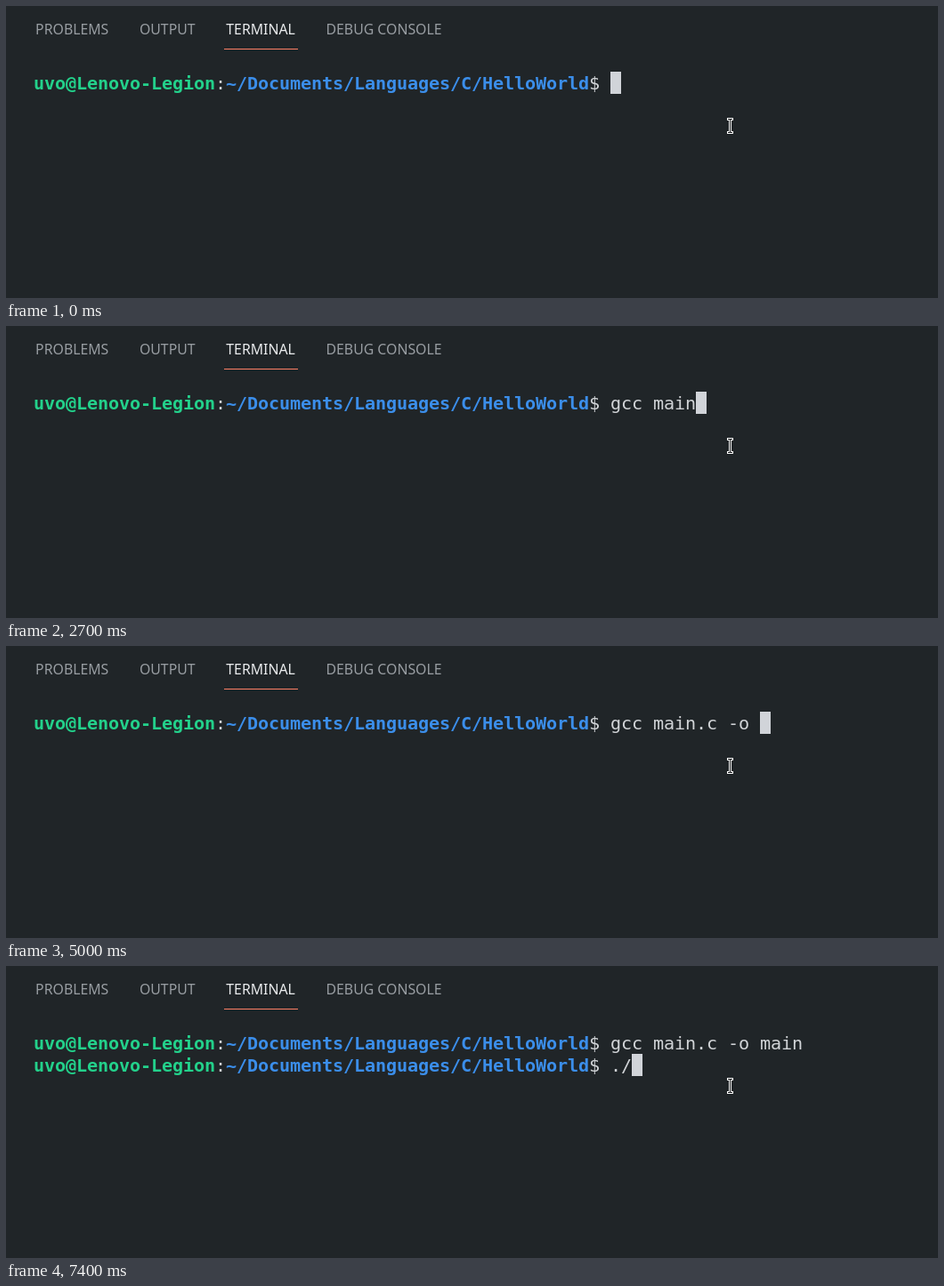
These frames come from a looping animation (1047 px wide and 329 px high, 8000 ms). An HTML page with a canvas:

```html
<!DOCTYPE html>
<html lang="en">
<head>
<meta charset="utf-8">
<title>Terminal</title>
<style>
  html, body { margin: 0; width: 100%; height: 100%; overflow: hidden; background: #202528; }
  canvas { display: block; }
</style>
</head>
<body>
<canvas id="stage" width="1047" height="329"></canvas>
<script>
const ctx = document.getElementById('stage').getContext('2d');

const LOOP = 8000;
const LEFT = 31, TOP = 74, CELL_W = 12, CELL_H = 25, BASELINE = 20;
const MONO = '20.16px "DejaVu Sans Mono", monospace';
const COLORS = {
  back: '#202528', text: '#d1d4d7', cursor: '#d1d4d9',
  green: '#23d18b', blue: '#3b8eea',
  tab: '#989da2', activeTab: '#e9ebed', underline: '#ff8066'
};

const TABS = [['PROBLEMS', 33.1], ['OUTPUT', 149.9], ['TERMINAL', 247.3], ['DEBUG CONSOLE', 359.5]];
const PROMPT = [
  ['uvo@Lenovo-Legion', COLORS.green, true],
  [':', COLORS.text, false],
  ['~/Documents/Languages/C/HelloWorld', COLORS.blue, true],
  ['$ ', COLORS.text, false]
];

// Each command holds its characters' key press times.
const ENTER = 6400;
const COMMANDS = [
  { start: 0, text: 'gcc main.c -o main',
    keys: [350, 800, 1000, 1500, 1850, 2100, 2450, 2700, 3250,
           3500, 4100, 4500, 4750, 5000, 5200, 5350, 5500, 5550] },
  { start: ENTER, text: './', keys: [7350, 7400] }
];

function rect(color, x, y, w, h) {
  ctx.fillStyle = color;
  ctx.fillRect(x, y, w, h);
}

// Writes on the character grid and returns the next free column.
function write(text, col, row, color, bold) {
  ctx.font = (bold ? 'bold ' : '') + MONO;
  ctx.fillStyle = color;
  for (const char of text) {
    ctx.fillText(char, LEFT + col * CELL_W, TOP + row * CELL_H + BASELINE);
    col++;
  }
  return col;
}

function drawTabs() {
  ctx.font = '15.84px "Noto Sans", sans-serif';
  for (const [label, x] of TABS) {
    ctx.fillStyle = label === 'TERMINAL' ? COLORS.activeTab : COLORS.tab;
    ctx.fillText(label, x, 32);
  }
  rect(COLORS.underline, 245, 48, 83, 1);
}

function drawLine({ text, keys }, row, time, active) {
  let col = 0;
  for (const [part, color, bold] of PROMPT) col = write(part, col, row, color, bold);
  const typed = keys.filter(key => key <= time).length;
  col = write(text.slice(0, typed), col, row, COLORS.text, false);
  if (active) rect(COLORS.cursor, LEFT + col * CELL_W, TOP + row * CELL_H, CELL_W, CELL_H);
}

function drawPointer(x, y) {
  rect('#ffffff', x, y, 7, 3);
  rect('#ffffff', x, y + 15, 7, 3);
  rect('#ffffff', x + 2, y, 3, 18);
  rect('#15181a', x + 1, y + 1, 5, 1);
  rect('#15181a', x + 1, y + 16, 5, 1);
  rect('#15181a', x + 3, y + 1, 1, 16);
}

function draw(time) {
  rect(COLORS.back, 0, 0, 1047, 329);
  drawTabs();
  const lines = COMMANDS.filter(command => command.start <= time);
  lines.forEach((line, row) => drawLine(line, row, time, row === lines.length - 1));
  drawPointer(810, 126);
}

let begin = null;
function tick(now) {
  begin ??= now;
  draw((now - begin) % LOOP);
  requestAnimationFrame(tick);
}
draw(0);
requestAnimationFrame(tick);
</script>
</body>
</html>
```
